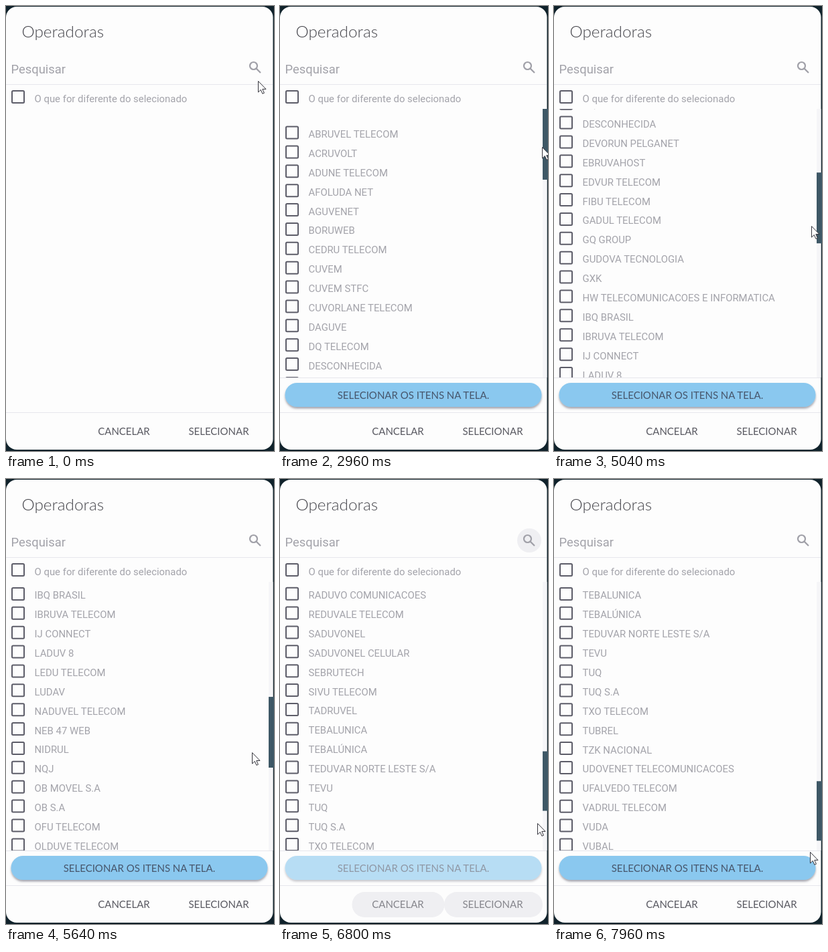
An HTML page that plays this animation: 400x666 px, repeating every 8000 ms.

```html
<!DOCTYPE html>
<html lang="pt-BR">
<head>
<meta charset="utf-8">
<title>Operadoras</title>
<style>
  html, body { margin: 0; width: 100%; height: 100%; overflow: hidden; background: #10222b; }
  svg { display: block; width: 100vw; height: 100vh; }
  text { font-family: Roboto, sans-serif; font-size: 14.9px; fill: #a3a3aa; }
  .action { font-family: Lato, sans-serif; font-size: 15px; fill: #5a5a62; text-anchor: middle; }
  .title { font-family: Lato, sans-serif; font-size: 24.3px; font-weight: 300; fill: #45454b; }
  .search { font-size: 18.4px; }
  .box { fill: none; stroke: #5c5c68; stroke-width: 2; }
  .rule { stroke: #e6e6ec; }
  .pill { fill: #efeff2; }
  .icon { fill: none; stroke: #a0a0a8; stroke-width: 2.2; }
</style>
</head>
<body>
<svg viewBox="0 0 400 666">
  <defs>
    <clipPath id="view"><rect y="154" width="398" height="402"/></clipPath>
    <filter id="shadow" x="-5%" y="-20%" width="110%" height="160%">
      <feDropShadow dx="0" dy="2.5" stdDeviation="1.8" flood-color="#505060" flood-opacity=".5"/>
    </filter>
    <g id="checkbox"><rect class="box" x="9" y="-16.5" width="18" height="18" rx="1.5"/></g>
  </defs>

  <rect y="1" width="398.5" height="663" rx="16" fill="#fdfdfd"/>
  <g id="pills">
    <circle class="pill" cx="372" cy="92" r="18"/>
    <rect class="pill" x="107.5" y="618" width="138" height="38" rx="19"/>
    <rect class="pill" x="245" y="618" width="147" height="38" rx="19"/>
  </g>
  <text class="title" x="23.5" y="47">Operadoras</text>
  <text class="search" x="7.5" y="100.5">Pesquisar</text>
  <g class="icon"><circle cx="369.5" cy="89.5" r="5.5"/><path d="M373.6 93.6L380 100"/></g>
  <path class="rule" d="M0 117.5H398M0 608.5H398"/>
  <use href="#checkbox" y="143.5"/>
  <text x="42.5" y="143.5">O que for diferente do selecionado</text>
  <g id="footer">
    <text class="action" x="176" y="642">CANCELAR</text>
    <text class="action" x="317.5" y="642">SELECIONAR</text>
  </g>

  <g id="results">
    <g clip-path="url(#view)"><g id="rows"></g></g>
    <rect x="392" y="154" width="6.5" height="402" fill="#f6f6f8"/>
    <rect id="thumb" x="392" width="8" fill="#3e5866"/>
    <path class="rule" d="M0 556.5H398"/>
    <g id="selectAll">
      <rect x="7.5" y="564" width="383" height="36" rx="18" fill="#8ac8ef" filter="url(#shadow)"/>
      <text class="action" x="199" y="587.5" style="fill:#47566c">SELECIONAR OS ITENS NA TELA.</text>
    </g>
  </g>

  <g id="ring">
    <circle r="13" fill="none" stroke="#e8c73a" stroke-width="1.5"/>
    <circle r="4.8" fill="#f09c14"/>
  </g>
  <path id="cursor" d="M.5 .5V17L4.3 13.4L6.9 19.3L9.4 18.2L6.8 12.4H12Z" fill="#fff" stroke="#34343c" stroke-linejoin="round"/>
</svg>

<script>
const LOOP = 8000, ROW = 28.88, TOP = 154, VIEW = 402, PADDING = 81.5;
const FIRST_PAGE = 50, FIRST_LOAD = 1040, SECOND_LOAD = 6440, LOAD_PEAKS = [1080, 6800];
const CLICKS = [{ time: 640, x: 354, y: 91 }, { time: 3960, x: 392, y: 212 }];

const names = `ABRUVEL TELECOM,ACRUVOLT,ADUNE TELECOM,AFOLUDA NET,AGUVENET,BORUWEB,CEDRU TELECOM,
CUVEM,CUVEM STFC,CUVORLANE TELECOM,DAGUVE,DQ TELECOM,DESCONHECIDA,DEVORUN PELGANET,EBRUVAHOST,
EDVUR TELECOM,FIBU TELECOM,GADUL TELECOM,GQ GROUP,GUDOVA TECNOLOGIA,GXK,
HW TELECOMUNICACOES E INFORMATICA,IBQ BRASIL,IBRUVA TELECOM,IJ CONNECT,LADUV 8,LEDU TELECOM,LUDAV,
NADUVEL TELECOM,NEB 47 WEB,NIDRUL,NQJ,OB MOVEL S.A,OB S.A,OFU TELECOM,OLDUVE TELECOM,
PADRUVE TELECOM,PELUNDAR,QUOVADRE NET,RADUVO COMUNICACOES,REDUVALE TELECOM,SADUVONEL,
SADUVONEL CELULAR,SEBRUTECH,SIVU TELECOM,TADRUVEL,TEBALUNICA,TEBALÚNICA,TEDUVAR NORTE LESTE S/A,
TEVU,TUQ,TUQ S.A,TXO TELECOM,TUBREL,TZK NACIONAL,UDOVENET TELECOMUNICACOES,UFALVEDO TELECOM,
VADRUL TELECOM,VUDA,VUBAL`.split(/,\s*/);

// Pointer stops; the scroll offset follows while the thumb is dragged.
const stops = [
  { time: 40, x: 376, y: 112, scroll: 0 },
  { time: 280, x: 354, y: 91, scroll: 0 },
  { time: 1440, x: 354, y: 91, scroll: 0 },
  { time: 1800, x: 220, y: 310, scroll: 0 },
  { time: 2720, x: 391, y: 211, scroll: 0 },
  { time: 3880, x: 391, y: 211, scroll: 0 },
  { time: 4160, x: 392, y: 226, scroll: 26 },
  { time: 5040, x: 384, y: 329, scroll: 361 },
  { time: 5640, x: 367, y: 409, scroll: 652.5 },
  { time: 6800, x: 384, y: 515, scroll: 1144 },
  { time: 7960, x: 382, y: 558, scroll: 1346 }
];

const clamp = v => Math.min(1, Math.max(0, v));
const peak = (t, center, halfWidth) => clamp(1 - Math.abs(t - center) / halfWidth);
const flash = age => clamp(age / 80 + 1) * clamp((480 - age) / 160);

function pointerAt(t) {
  const i = Math.max(1, stops.findLastIndex(s => s.time <= t) + 1);
  const a = stops[i - 1], b = stops[i] || a;
  const k = clamp((t - a.time) / (b.time - a.time || 1));
  const mix = key => a[key] + (b[key] - a[key]) * k;
  return { x: mix('x'), y: mix('y'), scroll: mix('scroll') };
}

const [rows, results, thumb, pills, footer, selectAll, ring, cursor] =
  ['rows', 'results', 'thumb', 'pills', 'footer', 'selectAll', 'ring', 'cursor']
    .map(id => document.getElementById(id));

rows.innerHTML = names.map((name, i) => `<g transform="translate(0 ${197 + i * ROW})">
  <use href="#checkbox"/><text x="42.5">${name}</text></g>`).join('');
const secondPage = [...rows.children].slice(FIRST_PAGE);

function move(node, x, y) {
  node.setAttribute('transform', `translate(${x} ${y})`);
}

function draw(t) {
  const { x, y, scroll } = pointerAt(t);
  const busy = Math.max(...LOAD_PEAKS.map(center => peak(t, center, 400)));
  const loaded = t >= SECOND_LOAD;
  const content = PADDING + ROW * (loaded ? names.length : FIRST_PAGE);
  const size = VIEW * VIEW / content;

  results.style.display = t < FIRST_LOAD ? 'none' : '';
  secondPage.forEach(row => { row.style.display = loaded ? '' : 'none'; });
  move(rows, 0, -scroll);
  thumb.setAttribute('y', TOP + scroll * VIEW / content);
  thumb.setAttribute('height', size);

  pills.style.opacity = busy;
  footer.style.opacity = 1 - .3 * busy;
  selectAll.style.opacity = 1 - .4 * busy;

  const click = CLICKS[t < 2000 ? 0 : 1];
  ring.style.opacity = flash(t - click.time);
  move(ring, click.x, click.y);
  move(cursor, x, y);
}

const start = performance.now();
function tick() {
  draw((performance.now() - start) % LOOP);
  requestAnimationFrame(tick);
}
tick();
</script>
</body>
</html>
```
